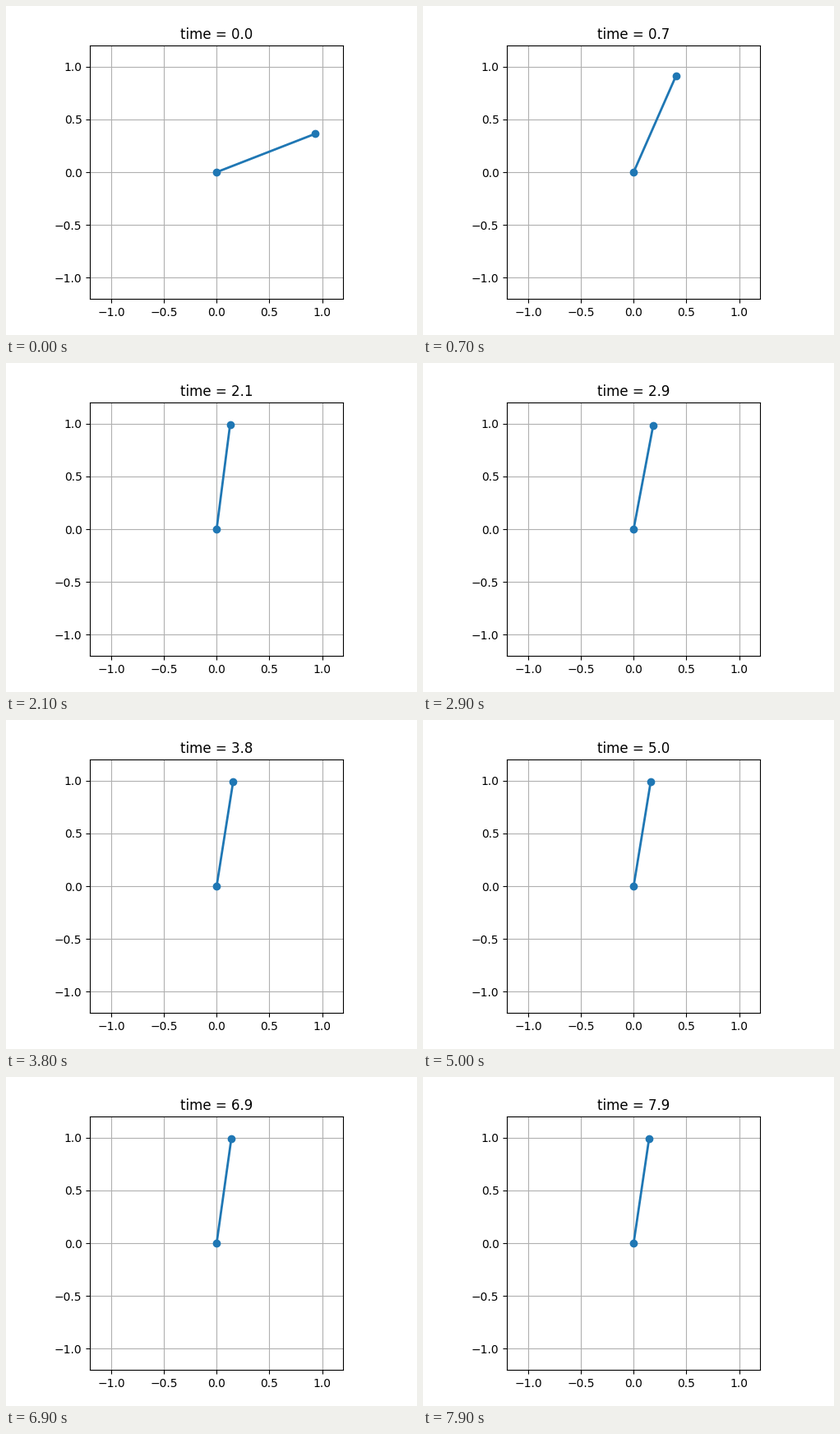
Write a matplotlib script that moves like this. It is 500 px wide and 400 px high and loops after 8 s.

```python
import matplotlib.pyplot as plt
import numpy as np
from matplotlib.animation import FuncAnimation

FRAMES, DT = 80, 0.1
DECAY, OMEGA = 1.5, 2.2      # damped swing towards rest
SWING = 60.0                 # starting distance from rest, degrees

# Slow wander of the rest angle: time in s, angle in degrees
REST_T = [0, 1.4, 2.9, 3.8, 5.0, 6.9, 7.9]
REST_DEG = [81.25, 81.15, 80.15, 81.05, 80.7, 82.0, 81.6]


def arm_angle(t):
    phase = OMEGA * t
    ring = np.cos(phase) + DECAY / OMEGA * np.sin(phase)
    swing = SWING * np.exp(-DECAY * t) * ring
    return np.radians(np.interp(t, REST_T, REST_DEG) - swing)


fig, ax = plt.subplots(figsize=(5, 4), dpi=100)
ax.set_aspect("equal")
ax.set_xlim(-1.2, 1.2)
ax.set_ylim(-1.2, 1.2)
ticks = np.arange(-1, 1.01, 0.5)
ax.set_xticks(ticks)
ax.set_yticks(ticks)
ax.grid()
arm, = ax.plot([], [], "o-", lw=2)
title = ax.set_title("time = 0.0")


def update(i):
    t = i * DT
    theta = arm_angle(t)
    arm.set_data([0, np.cos(theta)], [0, np.sin(theta)])
    title.set_text(f"time = {t:.1f}")
    return arm, title


anim = FuncAnimation(fig, update, frames=FRAMES, interval=100,
                     repeat=True, repeat_delay=0, blit=False)
plt.show()
```
